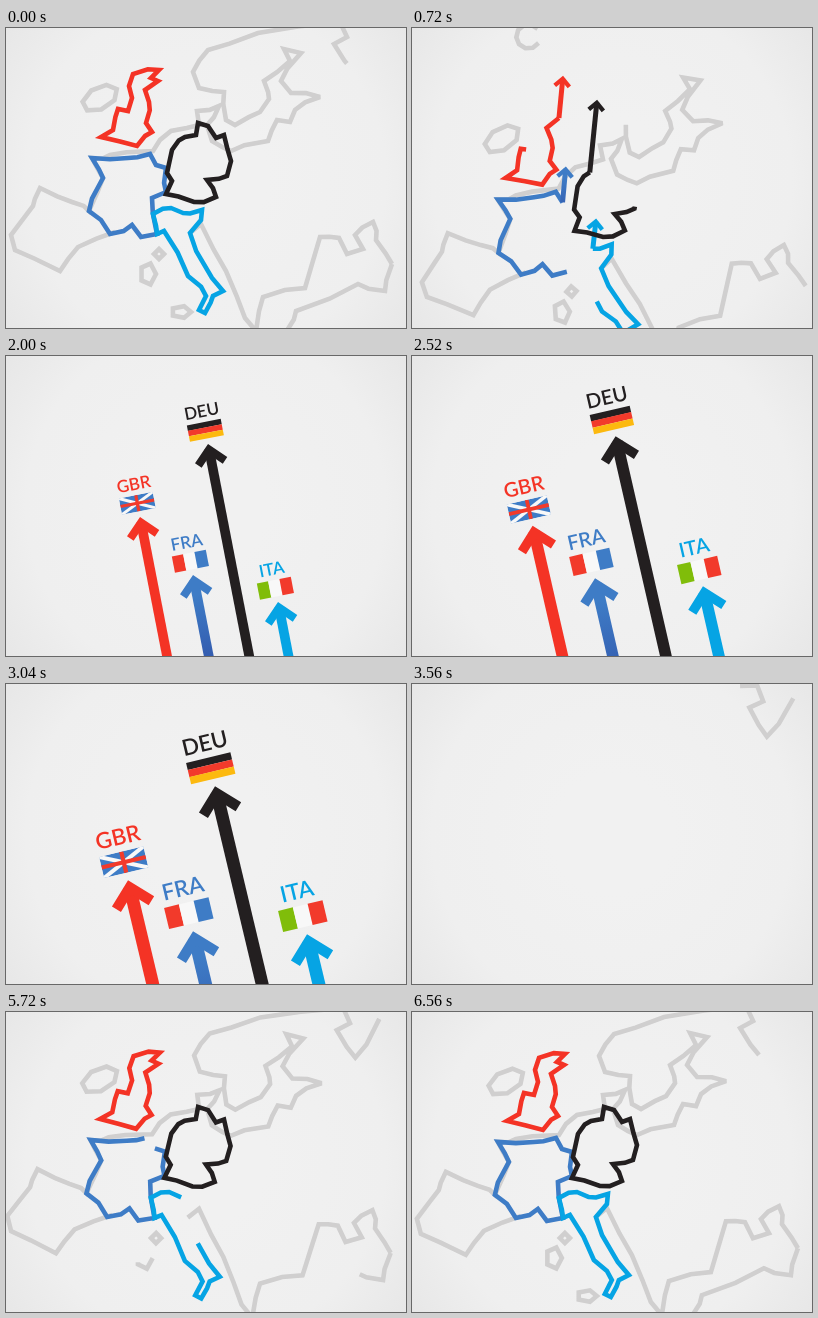
Animation of 400x300 px, one loop 6.6 s. Source, as an HTML page with a canvas:

```html
<!DOCTYPE html>
<html lang="en">
<head>
<meta charset="utf-8">
<title>Four economies</title>
<style>
html, body { margin: 0; width: 100%; height: 100%; overflow: hidden; background: #eee; }
canvas { display: block; }
</style>
</head>
<body>
<canvas id="stage" width="400" height="300"></canvas>
<script>
const ctx = document.getElementById('stage').getContext('2d');
const LOOP = 6600;
const RISE = 150, STRAIGHT = 1200, SETTLE = 2000, PEAK = 2740, REDRAW = 3480;
const PIVOT = [195, 100];
const GRAY = '#d0cfcf', WHITE = '#f8f8f8', RED = '#f23a2b', BLUE = '#3e7cc6';

const clamp = v => Math.max(0, Math.min(1, v));
const span = (t, a, b) => clamp((t - a) / (b - a));
const mix = (a, b, u) => a + (b - a) * u;
const mix2 = (p, q, u) => [mix(p[0], q[0], u), mix(p[1], q[1], u)];
const inOut = u => u * u * (3 - 2 * u);
const out3 = u => 1 - (1 - u) ** 3;
const backOut = u => 1 + 2.4 * (u - 1) ** 3 + 1.4 * (u - 1) ** 2;
const rad = d => d * Math.PI / 180;
const dist = (p, q) => Math.hypot(q[0] - p[0], q[1] - p[1]);

let seed = 7;
const random = () => (seed = seed * 16807 % 2147483647) / 2147483647;

function measure(pts, closed) {
  const at = [0];
  for (let i = 1; i < pts.length; i++) at.push(at[i - 1] + dist(pts[i - 1], pts[i]));
  return { pts, at, closed, len: at[at.length - 1] };
}

// Joins corner points; long edges get a small random kink
function coast(closed, ...n) {
  if (closed) n.push(n[0], n[1]);
  const pts = [[n[0], n[1]]];
  for (let i = 2; i < n.length; i += 2) {
    const p = [n[i - 2], n[i - 1]], q = [n[i], n[i + 1]], d = dist(p, q);
    if (d > 18) {
      const k = (random() - .5) * 5 / d;
      const m = mix2(p, q, .35 + .3 * random());
      pts.push([m[0] - (q[1] - p[1]) * k, m[1] + (q[0] - p[0]) * k]);
    }
    pts.push(q);
  }
  return measure(pts, closed);
}

function island(x, y, rx, ry, sides, tilt = 0) {
  const pts = [], c = Math.cos(rad(tilt)), s = Math.sin(rad(tilt));
  for (let i = 0; i <= sides; i++) {
    const a = i / sides * 2 * Math.PI;
    const u = rx * Math.cos(a), v = ry * Math.sin(a);
    pts.push([x + u * c - v * s, y + u * s + v * c]);
  }
  return measure(pts, true);
}

const mainland = coast(false,
  370, 4, 347, 43, 328, 16, 341, 9, 334, -6, 252, 5, 202, 22, 187, 44, 193, 60, 218, 64, 220, 92,
  229, 97, 254, 84, 263, 71, 258, 53, 284, 33, 278, 21, 295, 25, 275, 53, 285, 65, 314, 69, 289, 82,
  284, 94, 271, 92, 262, 113, 225, 123, 206, 113, 201, 97, 213, 78, 191, 83, 193, 97, 165, 103,
  147, 123, 104, 127, 86, 130, 97, 150, 83, 183, 66, 174, 34, 160, 27, 178, 5, 207, 9, 222,
  54, 243, 72, 219, 109, 204);
const balkans = coast(false,
  386, 236, 370, 212, 367, 194, 349, 207, 357, 221, 341, 226, 333, 210, 314, 209, 299, 260,
  257, 269, 250, 303, 239, 290, 220, 243, 195, 196, 184, 205);
const levant = coast(false, 386, 236, 379, 263, 352, 256, 290, 283, 280, 304);
const islands = [
  island(94, 70, 19, 11, 7, -28),
  island(153, 226, 5, 5, 4),
  island(142, 246, 8, 11, 5),
  island(175, 284, 10, 6, 5)
];
const iceland = island(127, -30, 12, 12, 10);

// Tips: a when straight, b once settled, c at the peak
const arrows = [
  { name: 'GBR', flag: 'uk', color: '#f43325', draw: [4470, 5330], gone: 1235,
    a: [150, 43], b: [134, 161], c: [117, 172],
    line: coast(true, 152, 53, 145, 50, 153, 42, 127, 46, 123, 58, 126, 70, 122, 83, 112, 81,
      107, 102, 95, 109, 131, 118, 146, 104, 140, 95, 143, 74, 139, 62) },
  { name: 'FRA', flag: 'fr', color: BLUE, deep: '#2f4fa6', draw: [4740, 5780], gone: 1390,
    a: [160, 144], b: [187, 219], c: [182, 223],
    line: coast(true, 150, 137, 160, 140, 160, 164, 146, 170, 151, 206, 135, 209, 126, 197,
      104, 206, 95, 192, 83, 183, 97, 150, 86, 130, 122, 130, 144, 126) },
  { name: 'ITA', flag: 'it', color: '#06a4e4', draw: [4820, 6010], gone: 1295,
    a: [195, 203], b: [272, 246], c: [296, 226],
    line: coast(true, 177, 185, 165, 180, 147, 186, 151, 206, 158, 203, 182, 248, 200, 268,
      193, 282, 199, 285, 207, 268, 217, 263, 206, 250, 184, 205, 195, 192, 196, 182) },
  { name: 'DEU', flag: 'de', color: '#231f20', draw: [4130, 4820], gone: 1200,
    a: [195, 14], b: [202, 88], c: [204, 78],
    line: coast(true, 179, 109, 190, 107, 192, 95, 202, 98, 210, 110, 218, 107, 225, 133,
      221, 148, 201, 152, 210, 169, 188, 174, 160, 166, 166, 153, 161, 145, 166, 122) }
];

function camera(t) {
  if (t > 3000) {
    const s = (LOOP - t) / 1000;
    return { x: 0, y: 0, turn: rad(1.33 * s), zoom: 1 + .009 * s };
  }
  const u = t / STRAIGHT;
  return { x: -5 * u * u, y: 95 * u * u, turn: rad(-1.6 * u - 7.9 * u * u), zoom: 1 + .013 * u * u };
}

function project(cam, p) {
  const x = p[0] - PIVOT[0], y = p[1] - PIVOT[1];
  const c = Math.cos(cam.turn) * cam.zoom, s = Math.sin(cam.turn) * cam.zoom;
  return [PIVOT[0] + cam.x + x * c - y * s, PIVOT[1] + cam.y + x * s + y * c];
}

// Strokes the part of a polyline between two fractions of its length
function trace(line, from, to, cam, color, dx = 0, dy = 0) {
  const a = clamp(from) * line.len, b = clamp(to) * line.len;
  if (b - a < .1) return;
  const { pts, at } = line;
  const point = (i, d) => mix2(pts[i], pts[i + 1], (d - at[i]) / (at[i + 1] - at[i]));
  const part = [];
  for (let i = 0; i < pts.length - 1; i++) {
    if (at[i + 1] <= a || at[i] >= b) continue;
    if (!part.length) part.push(point(i, Math.max(a, at[i])));
    part.push(point(i, Math.min(b, at[i + 1])));
  }
  const whole = line.closed && from <= 0 && to >= 1;
  if (whole) part.pop();
  ctx.beginPath();
  for (const p of part) {
    const q = project(cam, p);
    ctx.lineTo(q[0] + dx, q[1] + dy);
  }
  if (whole) ctx.closePath();
  ctx.strokeStyle = color;
  ctx.lineWidth = 4.6;
  ctx.stroke();
}

function grayMap(t, cam) {
  const late = t > REDRAW;
  const grown = (a, b) => late ? span(t, a, b) : 1;
  const since = Math.max(0, late ? t - 6250 : t + LOOP - 6250);
  const from = 55 * (since / 350) ** 1.56 / mainland.len;
  ctx.globalAlpha = late ? 1 : 1 - span(t, 1240, 1390);
  trace(mainland, from, Math.sin(grown(REDRAW, 4680) * Math.PI / 2), cam, GRAY);
  trace(balkans, 0, grown(4560, 5700), cam, GRAY);
  trace(levant, late ? 0 : span(t, 100, 900), grown(5350, 6400), cam, GRAY);
  islands.forEach((line, i) => trace(line, 0, grown(4850 + 330 * i, 5350 + 330 * i), cam, GRAY));
  if (!late) trace(iceland, .1, .9, cam, GRAY);
  ctx.globalAlpha = 1;
}

function bands(colors, w, h, upright) {
  const n = colors.length;
  colors.forEach((c, i) => {
    ctx.fillStyle = c;
    if (upright) ctx.fillRect(-w / 2 + i * w / n, -h / 2, w / n + .1, h);
    else ctx.fillRect(-w / 2, -h / 2 + i * h / n, w, h / n + .1);
  });
}

function segment(x1, y1, x2, y2, width, color) {
  ctx.beginPath();
  ctx.moveTo(x1, y1);
  ctx.lineTo(x2, y2);
  ctx.lineWidth = width;
  ctx.strokeStyle = color;
  ctx.stroke();
}

function unionFlag(w, h) {
  const x = w / 2, y = h / 2;
  ctx.save();
  ctx.beginPath();
  ctx.rect(-x, -y, w, h);
  ctx.clip();
  bands([BLUE], w, h);
  for (const k of [1, -1]) segment(-x, -y * k, x, y * k, 3, WHITE);
  segment(-x, 0, x, 0, 3.2, RED);
  segment(0, -y, 0, y, 3.2, RED);
  ctx.restore();
}

const flags = {
  uk: unionFlag,
  fr: (w, h) => bands([RED, WHITE, BLUE], w, h, true),
  it: (w, h) => bands(['#80bd0a', WHITE, RED], w, h, true),
  de: (w, h) => bands(['#231f20', RED, '#fcb90f'], w, h)
};

function shaft(a, size, length, width) {
  let paint = a.color;
  if (a.deep) {
    paint = ctx.createLinearGradient(0, 20 * size, 0, 110 * size);
    paint.addColorStop(0, a.color);
    paint.addColorStop(1, a.deep);
  }
  segment(0, 5 * size, 0, length, width, paint);
}

function arrow(a, tip, angle, size, length, width, label) {
  ctx.save();
  ctx.translate(tip[0], tip[1]);
  ctx.rotate(angle);
  if (length > 5 * size) shaft(a, size, length, width);
  ctx.scale(size, size);
  ctx.beginPath();
  ctx.moveTo(-13.6, 19.3);
  ctx.lineTo(0, 5.7);
  ctx.lineTo(13.6, 19.3);
  ctx.lineWidth = 8;
  ctx.strokeStyle = a.color;
  ctx.stroke();
  if (label > 0) {
    ctx.scale(label, label);
    ctx.save();
    ctx.translate(0, -14);
    flags[a.flag](34.5, 16.5);
    ctx.restore();
    ctx.fillStyle = a.color;
    ctx.font = '600 17px Lato, "Open Sans", sans-serif';
    ctx.textAlign = 'center';
    ctx.fillText(a.name, 0, -27.5);
  }
  ctx.restore();
}

// The outline unwinds into a rising straight line
function unwind(a, t, cam) {
  const base = a.line.pts[0];
  const foot = project(cam, base);
  const first = project(camera(STRAIGHT), base);
  const reach = [a.a[0] - first[0], a.a[1] - first[1]];
  const tilt = Math.atan2(reach[0], -reach[1]);
  const full = Math.hypot(...reach);
  const from = span(t, RISE, a.gone) ** 1.6;
  if (t <= STRAIGHT) {
    trace(a.line, from, 1, cam, a.color);
    const u = span(t, RISE, STRAIGHT) ** 1.6;
    if (u <= 0) return;
    const tip = [foot[0] + reach[0] * u, foot[1] + reach[1] * u];
    arrow(a, tip, tilt, .54 * span(t, RISE, 450), full * u, 5, 0);
    return;
  }
  const u = span(t, STRAIGHT, SETTLE), v = inOut(u);
  const tip = mix2(a.a, a.b, out3(u));
  const angle = mix(tilt, rad(-11), v);
  const length = full + 400 * span(t, STRAIGHT, 1750);
  const end = [tip[0] - Math.sin(angle) * length, tip[1] + Math.cos(angle) * length];
  trace(a.line, from, 1, cam, a.color, end[0] - foot[0], end[1] - foot[1]);
  const pop = span(t, 1560, 1840);
  arrow(a, tip, angle, mix(.54, 1, v), length, mix(5, 10, v), pop && backOut(pop));
}

// The arrows grow towards the viewer, then drop out of view
function race(a, t) {
  const u = inOut(span(t, SETTLE, PEAK));
  const v = Math.max(0, t - PEAK) / 300;
  const tip = mix2(a.b, a.c, u);
  tip[0] += 5 * v;
  tip[1] += 24 * v ** 2.5;
  const size = mix(1, 1.24, u) + .08 * v;
  arrow(a, tip, rad(mix(-11, -13.4, u)), size, 500, 9.7 * size, 1);
}

function backdrop() {
  const g = ctx.createRadialGradient(200, 150, 60, 200, 150, 260);
  g.addColorStop(0, '#f1f1f1');
  g.addColorStop(.6, '#efefef');
  g.addColorStop(1, '#e6e6e6');
  ctx.fillStyle = g;
  ctx.fillRect(0, 0, 400, 300);
}

function render(t) {
  backdrop();
  ctx.miterLimit = 3;
  const cam = camera(t);
  if (t < 1400 || t > REDRAW) grayMap(t, cam);
  for (const a of arrows) {
    if (t < SETTLE) unwind(a, t, cam);
    else if (t < 3850) race(a, t);
    else trace(a.line, 0, span(t, ...a.draw), cam, a.color);
  }
}

const start = performance.now();
function tick() {
  render((performance.now() - start) % LOOP);
  requestAnimationFrame(tick);
}
tick();
</script>
</body>
</html>
```
